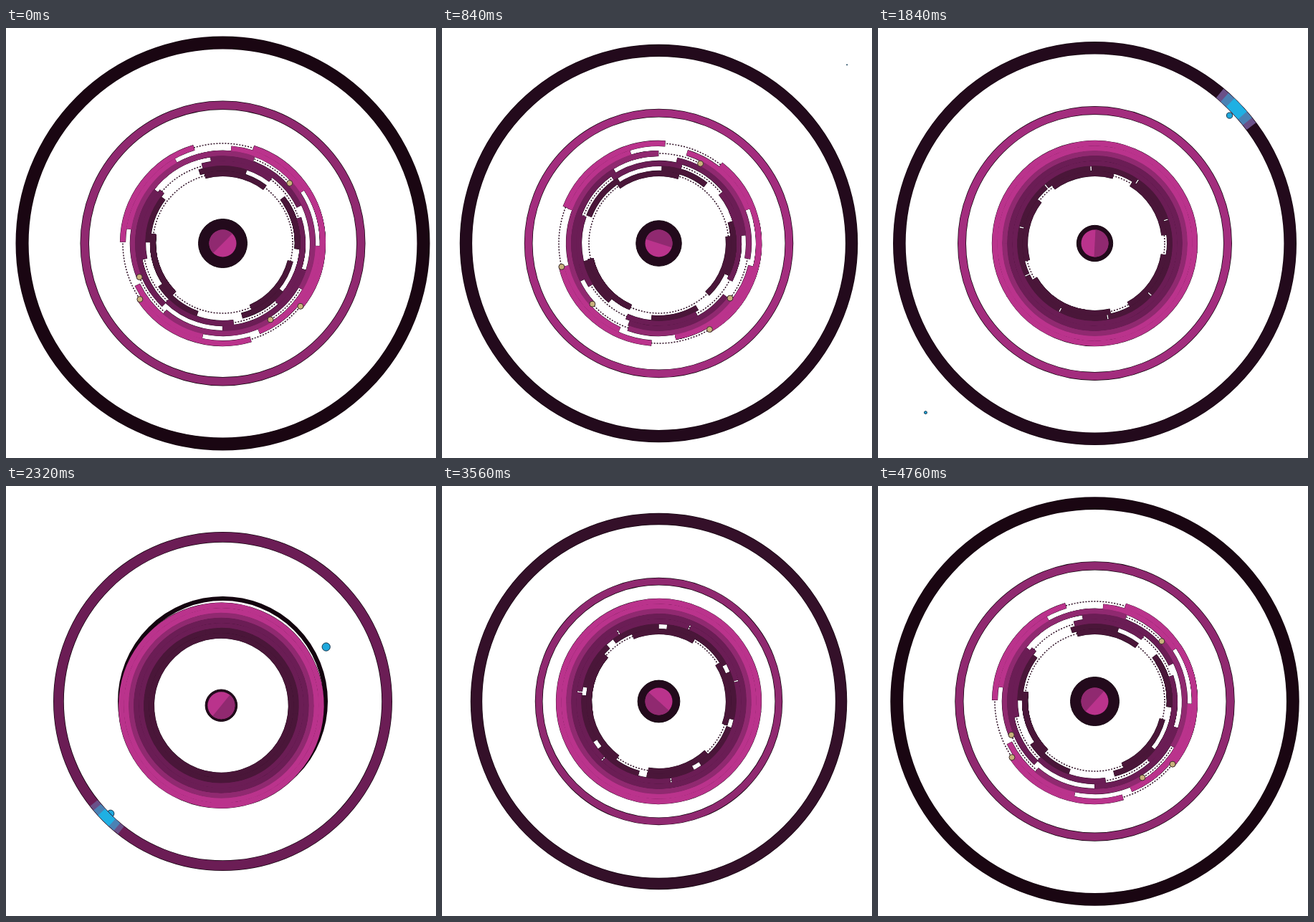
Recreate the animation shown at these times as an HTML page with a canvas. Size 600 by 600 pixels, loop 4.8 s.

```html
<!DOCTYPE html>
<html lang="en">
<head>
<meta charset="utf-8">
<title>Ring tunnel</title>
<style>
html, body { margin: 0; width: 100%; height: 100%; overflow: hidden; background: #fff; }
canvas { display: block; width: 600px; height: 600px; }
</style>
</head>
<body>
<canvas id="stage" width="600" height="600"></canvas>
<script>
const ctx = document.getElementById('stage').getContext('2d');
const LOOP = 4800, STEP = 40, CX = 302.5, CY = 300.5, TAU = Math.PI * 2;
const DARK = '#14040f', PINK = '#ba338c', PLUM = '#902970', WINE = '#6b1d55', DEEP = '#4a1639';
const rad = deg => deg * Math.PI / 180;
const clamp = (x, lo = 0, hi = 1) => Math.min(hi, Math.max(lo, x));
const smooth = x => { x = clamp(x); return x * x * (3 - 2 * x); };

// Each band is a fan of n equal arcs; the fan opens by `gap` degrees per arc.
// dots: arc index -> how far open the fan must be to show its bead
const bands = [
  { r: 139.5, color: PINK, n: 5, base: 327, gap: 35, spin: 1, dots: { 0: .8, 1: .8 } },
  { r: 132.5, color: PINK, n: 7, base: 16, gap: 35, spin: .6 },
  { r: 125.5, color: PLUM, n: 5, base: 218, gap: 28, spin: -1, dots: { 1: .9, 2: .5, 3: .2 } },
  { r: 118.5, color: WINE, n: 5, base: 146, gap: 44, spin: 1 },
  { r: 111.5, color: WINE, n: 7, base: -4, gap: 35, spin: -1 },
  { r: 104.5, color: DEEP, n: 10, base: -32, gap: 35, spin: 1 },
  { r: 97.5, color: DEEP, n: 7, base: 136, gap: 68, spin: -1 }
];

const shots = [
  { start: 840, hit: 2240, angle: -43.5, bounce: [148, 104], push: [-.35, .94] },
  { start: 1400, hit: 2516, angle: 135, bounce: [8, 121], push: [.35, -.94] }
];

// Ring colour up to each outer radius
const shades = [[157, DARK], [164, DEEP], [171, WINE], [178, PLUM], [193, '#a32d7e'], [214, PLUM],
  [238, WINE], [256, DEEP], [268, '#341029'], [283, '#230a1c'], [294, '#1a0612'], [400, '#080206']];

function disc(x, y, r, fill, outline) {
  ctx.beginPath();
  ctx.arc(x, y, r, 0, TAU);
  ctx.fillStyle = fill;
  ctx.fill();
  if (outline) {
    ctx.strokeStyle = outline;
    ctx.lineWidth = 1;
    ctx.stroke();
  }
}

function arc(r, from, to, width, color) {
  ctx.beginPath();
  ctx.arc(0, 0, r, from, to);
  ctx.lineWidth = width;
  ctx.strokeStyle = color;
  ctx.stroke();
}

function shotState(shot, t) {
  const a = rad(shot.angle), since = t - shot.hit;
  if (t < shot.start || since > 600) return null;
  if (since < 0) {
    const u = (t - shot.start) / (shot.hit - shot.start);
    const r = 362 - 214 * u ** 2.18;
    return { x: r * Math.cos(a), y: r * Math.sin(a), r, size: .6 + 6 * u ** 1.6 };
  }
  const u = since / 600, e = 1 - (1 - u) ** 2;
  return {
    x: 148 * Math.cos(a) + shot.bounce[0] * e,
    y: 148 * Math.sin(a) + shot.bounce[1] * e,
    size: 6.5 * (1 - u)
  };
}

function drawRings(t) {
  ctx.save();
  ctx.beginPath();
  ctx.arc(0, 0, 299, 0, TAU);
  ctx.clip();
  for (let k = 1; k < 4; k++) {
    const outer = (19 + t * .09375) % 90 + 90 * k;
    if (outer < 131 || outer > 303) continue;
    const width = Math.min(outer / 16, (outer - 130) * .37), mid = outer - width / 2;
    arc(mid, 0, TAU, width, DARK);
    arc(mid, 0, TAU, Math.max(.5, width - 1.5), shades.find(s => outer < s[0])[1]);
    // A shot passing through tints the ring around it
    for (const shot of shots) {
      const s = shotState(shot, t);
      if (!s || !s.r || Math.abs(s.r - mid) > 16) continue;
      const a = rad(shot.angle);
      [[.117, '#6a5088'], [.085, '#4a82b4'], [.045, '#1fb0e3']].forEach(([half, color]) =>
        arc(mid, a - half, a + half, width - 1.5, color));
    }
  }
  ctx.restore();
}

// The fans close from the outside in and open from the inside out
function openness(i, t) {
  return t < 2400
    ? 1 - smooth((t - 900 - 100 * i) / 500)
    : smooth((t - 3820 + 80 * i) / 500);
}

function drawTunnel(t) {
  const near = t < 2400 ? t : t - LOOP;
  const turn = 38 * Math.sign(near) * smooth(Math.abs(near) / 1600);

  ctx.setLineDash([2, 2]);
  for (let i = 0; i < 7; i += 2)
    if (openness(i, t) > 0 || openness(Math.min(6, i + 1), t) > 0) arc(bands[i].r, 0, TAU, 1.5, '#2a0a20');
  ctx.setLineDash([]);

  const arcs = [], beads = [];
  bands.forEach((band, index) => {
    const length = 360 / band.n, open = openness(index, t);
    for (let i = 0; i < band.n; i++) {
      const offset = Math.min(360, i * (length + band.gap * open));
      const start = band.base + band.spin * turn + offset;
      arcs.push({ ...band, from: rad(start), to: rad(start + length) });
      if (band.dots && open > band.dots[i])
        beads.push([band.r, rad(band.spin > 0 ? start + length : start)]);
    }
  });
  for (const a of arcs) arc(a.r, a.from - .005, a.to + .005, 8.2, DARK);
  for (const a of arcs) arc(a.r, a.from - .003, a.to + .003, 7.5, a.color);
  for (const [r, a] of beads) disc(r * Math.cos(a), r * Math.sin(a), 4, '#c9b27c', '#3a2a2a');
}

function drawCore(t) {
  const swell = Math.abs(Math.cos(Math.PI * t / LOOP));
  disc(0, 0, 22 + 12 * swell ** 1.3, '#230a1c', DARK);
  disc(0, 0, 19, PINK);
  const facing = rad(-135 + 360 * t / LOOP);
  ctx.beginPath();
  ctx.arc(0, 0, 19, facing - Math.PI / 2, facing + Math.PI / 2);
  ctx.fillStyle = PLUM;
  ctx.fill();
}

function draw(now) {
  const t = Math.floor(now % LOOP / STEP) * STEP;
  ctx.setTransform(1, 0, 0, 1, 0, 0);
  ctx.fillStyle = '#fff';
  ctx.fillRect(0, 0, 600, 600);
  ctx.translate(CX, CY);

  for (const shot of shots) {
    const s = shotState(shot, t);
    if (s) disc(s.x, s.y, s.size, '#1fa8dc', '#123047');
  }
  drawRings(t);

  for (const { hit, push } of shots) {
    const since = t - hit;
    if (since < 0 || since > 450) continue;
    const force = 9 * (1 - since / 450) ** 2;
    ctx.translate(push[0] * force, push[1] * force);
  }
  drawTunnel(t);
  drawCore(t);
}

let begin;
function tick(now) {
  begin ??= now;
  draw(now - begin);
  requestAnimationFrame(tick);
}
draw(0);
requestAnimationFrame(tick);
</script>
</body>
</html>
```
